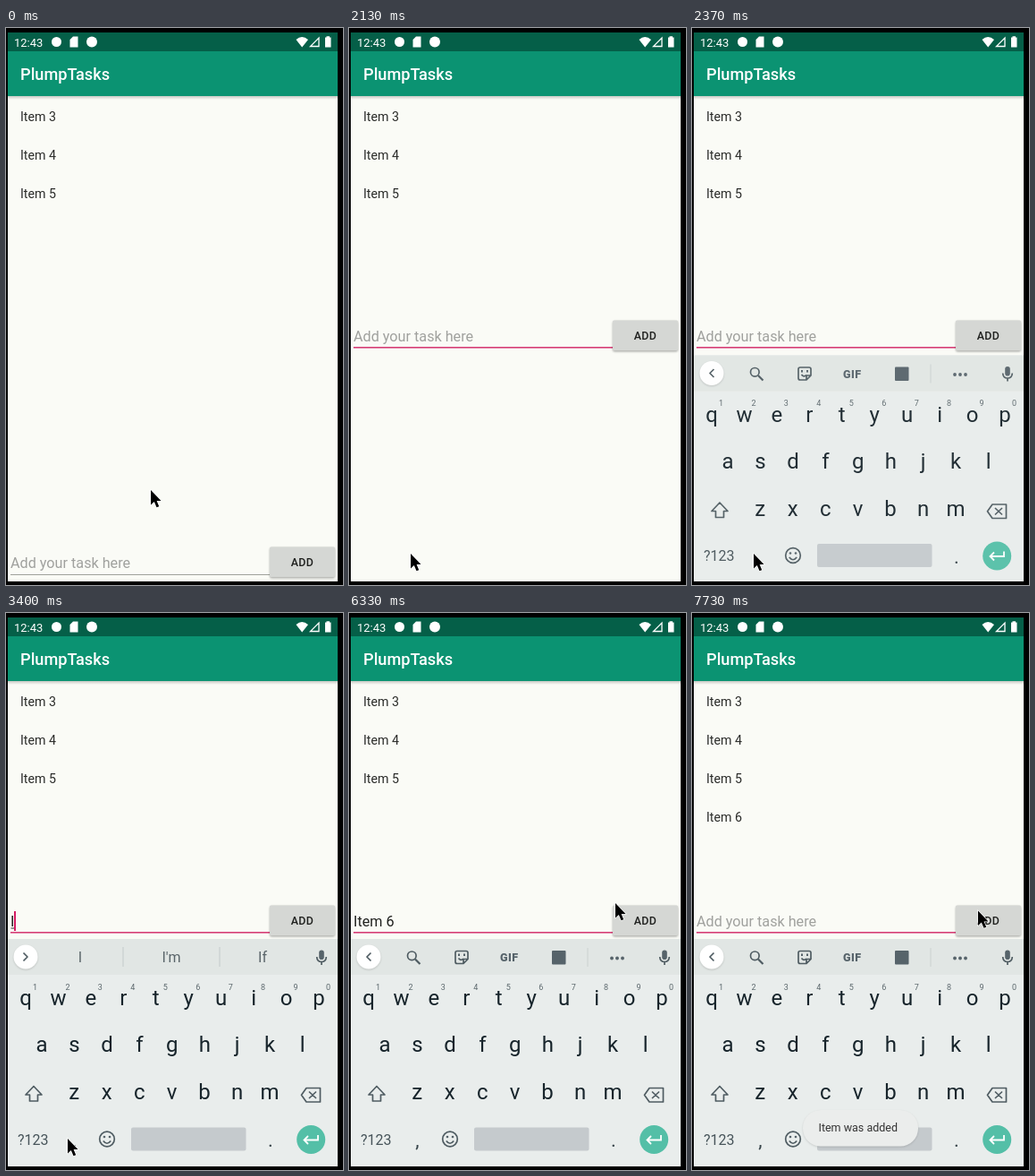
Recreate the animation shown at these times as an HTML page. Size 377x622 px, loop 8000 ms.

```html
<!DOCTYPE html>
<html lang="en">
<head>
<meta charset="utf-8">
<title>Task list</title>
<style>
  html, body { margin: 0; width: 100%; height: 100%; overflow: hidden; background: #000; }
  svg { display: block; width: 377px; height: 622px; font-family: Roboto, sans-serif; }
  text { white-space: pre; }
  .mid { text-anchor: middle; }
  .item { font-size: 14.2px; fill: #2a2b29; }
  .field { font-size: 16.2px; }
  .key { font-size: 24px; fill: #17242b; }
  .num { font-size: 9px; fill: #5b676c; }
  .chip { font-size: 16px; fill: #596469; }
  .line { fill: none; stroke: #4f5c62; stroke-width: 1.7; stroke-linejoin: round; }
  .icon { fill: #56636a; }
</style>
</head>
<body>
<svg viewBox="0 0 377 622">
  <defs>
    <clipPath id="screen"><rect x="2" y="5" width="369" height="613"/></clipPath>
    <clipPath id="btnClip"><rect x="295" y="326.500" width="73" height="33.500" rx="1.500"/></clipPath>
    <linearGradient id="shade" x1="0" y1="0" x2="0" y2="1">
      <stop offset="0" stop-opacity=".2"/><stop offset="1" stop-opacity="0"/>
    </linearGradient>
    <filter id="soft" x="-20%" y="-40%" width="140%" height="180%"><feGaussianBlur stdDeviation="1.2"/></filter>
  </defs>
  <rect width="377" height="622"/>
  <g clip-path="url(#screen)">
    <rect x="2" y="5" width="369" height="613" fill="#fafbf6"/>
    <rect x="2" y="76" width="369" height="4" fill="url(#shade)"/>
    <rect x="2" y="26" width="369" height="50" fill="#0b9372"/>
    <rect x="2" y="5" width="369" height="21" fill="#055f48"/>

    <g fill="#fff">
      <text x="9" y="20.500" font-size="13">12:43</text>
      <circle cx="56.500" cy="15.500" r="5.500"/>
      <path d="M75 9.500H80.500V21.500H71.500V13Z"/>
      <circle cx="96" cy="15.500" r="6"/>
      <path d="M324.500 13Q331 7 338 13L331.200 21.500Z"/>
      <path d="M350 11V20.500H340.500Z" fill="none" stroke="#fff" stroke-width="1.300"/>
      <path d="M358.500 10.500V9.200H362V10.500H363.500V21.500H357V10.500Z"/>
      <text x="16" y="58.300" font-size="18.200" font-weight="500">PlumpTasks</text>
    </g>

    <g class="item">
      <text x="16" y="103.500">Item 3</text>
      <text x="16" y="146.500">Item 4</text>
      <text x="16" y="189.500">Item 5</text>
      <text x="16" y="232.500" id="added">Item 6</text>
    </g>

    <g id="entry">
      <rect id="rule" x="5" width="291"/>
      <text id="hint" class="field" x="5" y="350.300" fill="#a0a19e">Add your task here</text>
      <text id="typed" class="field" x="5" y="350.300" fill="#20211f"></text>
      <rect id="compose" x="5.500" y="351.500" height="1" fill="#333"/>
      <rect id="caret" y="333" width="2" height="22" fill="#d41b62"/>
      <rect x="295" y="327.500" width="73" height="34" rx="2" opacity=".3" filter="url(#soft)"/>
      <rect x="295" y="326.500" width="73" height="33.500" rx="1.500" fill="#d5d7d4"/>
      <g clip-path="url(#btnClip)"><circle id="ripple" cx="320" cy="334"/></g>
      <text class="mid" x="331.500" y="347.700" font-size="12.400" font-weight="500" letter-spacing=".3" fill="#20211f">ADD</text>
    </g>

    <g id="board">
      <rect x="2" y="364" width="369" height="260" fill="#e9edec"/>
      <rect x="2" y="364" width="369" height="40" fill="#e1e6e4"/>
      <circle cx="22" cy="385" r="13.500" opacity=".15" filter="url(#soft)"/>
      <circle cx="22" cy="384" r="13.500" fill="#fff"/>
      <path id="chevron" class="line" d="M24.500 379.500L20 384L24.500 388.500"/>
      <g id="tools">
        <circle class="line" cx="70.300" cy="382.800" r="4.800"/>
        <path class="line" d="M74 386.500L79.500 392" style="stroke-width:2.200"/>
        <path class="line" d="M121 377.500H131Q133 377.500 133 379.500V386.500L128 391.500H121Q119 391.500 119 389.500V379.500Q119 377.500 121 377.500ZM133 386.500H128V391.500M122.500 385.500Q125 389 128 386"/>
        <path class="icon" d="M122 380.500H124V383H122ZM128 380.500H130V383H128Z"/>
        <text class="mid icon" x="179.300" y="389" font-size="12.500" font-weight="800" letter-spacing=".5">GIF</text>
        <rect class="icon" x="227" y="377" width="15.500" height="15.500" rx="1"/>
        <rect x="266.500" y="374" width="1" height="21" fill="#cbd1d0"/>
        <g class="icon">
          <circle cx="294" cy="385.500" r="1.900"/><circle cx="300" cy="385.500" r="1.900"/><circle cx="306" cy="385.500" r="1.900"/>
        </g>
      </g>
      <g id="chips">
        <rect x="130.500" y="373" width="1" height="22" fill="#c3cac9"/>
        <rect x="238.500" y="373" width="1" height="22" fill="#c3cac9"/>
        <text class="chip mid" x="83" y="390.300"></text>
        <text class="chip mid" x="185" y="390.300"></text>
        <text class="chip mid" x="287" y="390.300"></text>
      </g>
      <rect class="icon" x="350.200" y="376.500" width="5.600" height="10.500" rx="2.800"/>
      <path class="line" d="M347.700 384Q348 389.500 353 389.500Q358 389.500 358.300 384M353 389.500V393"/>

      <g id="keys"></g>
      <path class="line" d="M31 528.500L40 538H35.500V545H26.500V538H22Z"/>
      <path class="line" d="M336 530.500H351.500V546H336L330.500 538.200ZM339 534.500L347 542M347 534.500L339 542"/>
      <text x="13" y="593.500" font-size="16" fill="#47545a">?123</text>
      <text class="mid" x="76.500" y="596" font-size="22" fill="#37444a">,</text>
      <circle class="line" cx="113" cy="587.500" r="8.300"/>
      <path class="line" d="M108.800 589.500Q113 595 117.200 589.500"/>
      <circle class="icon" cx="110" cy="585" r="1.300"/><circle class="icon" cx="116" cy="585" r="1.300"/>
      <rect x="140" y="574.500" width="128.500" height="26" rx="2" fill="#c5cacd"/>
      <text class="mid" x="296" y="596" font-size="22" fill="#37444a">.</text>
      <circle cx="341.200" cy="588" r="16" fill="#54bfa7"/>
      <path d="M349 583V588.500H334M338 584L333.500 588.500L338 593" fill="none" stroke="#fff" stroke-width="1.800"/>
    </g>

    <g id="toast">
      <rect x="124" y="556" width="129" height="40.500" rx="20" opacity=".13" filter="url(#soft)"/>
      <rect x="124" y="555" width="129" height="40.500" rx="20" fill="#ebedec"/>
      <text x="141.500" y="579.300" font-size="12.500" fill="#333">Item was added</text>
    </g>
  </g>
  <path id="mouse" d="M0 0V16.500L3.800 13L6.500 19.300L9.200 18.200L6.600 12H11.500Z" stroke="#fff" stroke-width="1.200" paint-order="stroke"/>
</svg>
<script>
const LOOP = 8000;
const $ = id => document.getElementById(id);
const set = (id, attrs) => { for (const k in attrs) $(id).setAttribute(k, attrs[k]); };
const show = (id, on) => { $(id).style.display = on ? '' : 'none'; };
const clamp = v => Math.max(0, Math.min(1, v));

function addKey(cls, x, y, label) {
  const el = document.createElementNS('http://www.w3.org/2000/svg', 'text');
  el.setAttribute('class', cls + ' mid');
  el.setAttribute('x', x);
  el.setAttribute('y', y);
  el.textContent = label;
  $('keys').append(el);
}
const PITCH = 36.45;
[['qwertyuiop', 22], ['asdfghjkl', 40], ['zxcvbnm', 76.3]].forEach(([row, x], r) => {
  [...row].forEach((c, i) => addKey('key', x + i * PITCH, 438 + r * 53 - (r ? 0.7 : 0), c));
});
[...'1234567890'].forEach((c, i) => addKey('num', 32.5 + i * PITCH, 420.8, c));

// Each track: [start, ...values], held until the next start
const mouse = [
  [0, 162, 516], [730, 139, 528], [870, 123, 541], [970, 105, 556], [1070, 87, 571],
  [1170, 75, 582], [1270, 69, 587], [6000, 95, 566], [6070, 155, 506], [6130, 222, 420],
  [6200, 276, 345], [6330, 298, 324], [6470, 304, 327], [6530, 312, 330], [6670, 320, 332.5]
];
const typing = [
  [0, '', 5], [3400, 'I', 9], [3470, 'It', 14], [3530, 'Ite', 22.5], [3600, 'Item', 37],
  [4100, 'Item ', 41], [5530, 'Item 6', 50], [7100, '', 5]
];
const suggestions = [
  [0, ''], [3400, "I,I'm,If"], [3470, "It,It's,Its"], [3530, 'Ite,Item,Items'],
  [3600, "Item,Items,Item's"], [4170, 'I,is,and'], [5600, '']
];
const blink = [
  [0, 0], [1570, 1], [2130, 0], [2670, 1], [3200, 0], [3400, 1], [4670, 0],
  [5170, 1], [6100, 0], [6600, 1], [7600, 0]
];
const slide = [[0, 260, 0], [2300, 16, .35], [2330, 5, .7], [2370, 1.5, .95], [2400, .6, 1], [2430, 0, 1]];

function at(track, t) {
  let cur = track[0];
  for (const step of track) if (step[0] <= t) cur = step;
  return cur;
}

function render(t) {
  const [, mx, my] = at(mouse, t);
  set('mouse', { transform: `translate(${mx} ${my})` });

  const focused = t >= 1570;
  set('entry', { transform: `translate(0 ${t < 2130 ? 253 : 0})` });
  set('rule', focused
    ? { y: 356, height: 1.6, fill: '#d63d76' }
    : { y: 357, height: 1, fill: '#9fa19b' });

  const [, word, end] = at(typing, t);
  $('typed').textContent = word;
  show('hint', !word);
  show('compose', t >= 3400 && t < 4100);
  set('compose', { width: Math.max(0, end - 5.5) });
  show('caret', at(blink, t)[1]);
  set('caret', { x: end });

  const [, dy, alpha] = at(slide, t);
  set('board', { transform: `translate(0 ${dy})`, opacity: alpha });
  const words = at(suggestions, t)[1];
  show('tools', !words);
  show('chips', words);
  set('chevron', { transform: words ? 'rotate(180 22 384)' : '' });
  const list = words.split(',');
  $('chips').querySelectorAll('text').forEach((el, i) => { el.textContent = list[i] || ''; });

  show('added', t >= 7100);
  const grow = clamp((t - 7000) / 300);
  set('ripple', {
    r: t < 7000 ? 0 : 8 + 47 * grow,
    opacity: t < 7000 ? 0 : .14 * (1 - clamp((t - 7200) / 350))
  });
  set('toast', { opacity: clamp((t - 7170) / 530) });
}

const start = performance.now();
function tick() {
  render((performance.now() - start) % LOOP);
  requestAnimationFrame(tick);
}
tick();
</script>
</body>
</html>
```
